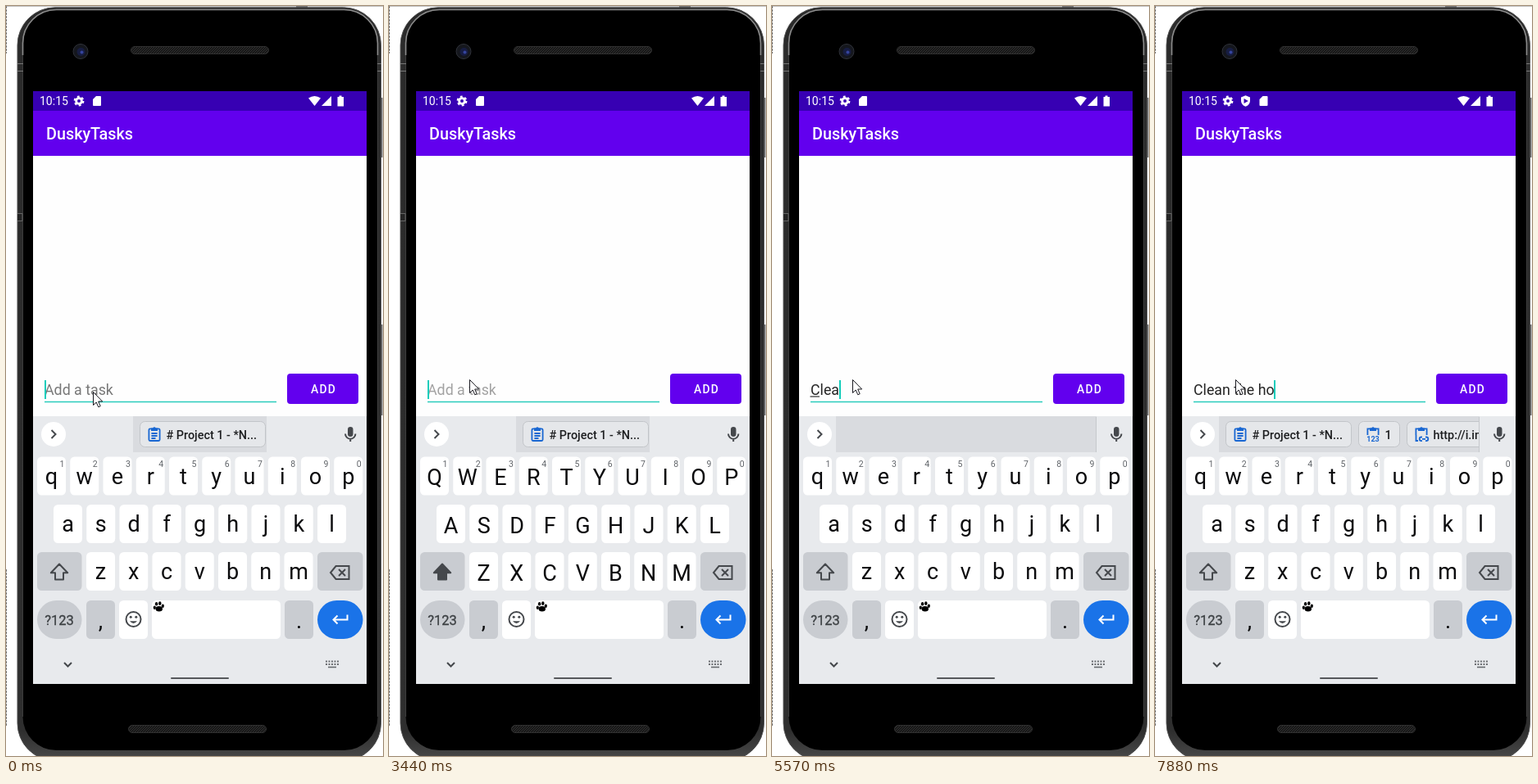
Recreate the animation shown at these times as an HTML page. Size 460 px wide and 916 px high, loop 8 s.

```html
<!DOCTYPE html>
<html lang="en">
<head>
<meta charset="utf-8">
<title>To-do typing</title>
<style>
  html, body { margin: 0; width: 100%; height: 100%; overflow: hidden; background: #fff; }
  svg { display: block; width: 460px; height: 916px; font-family: Roboto, sans-serif; }
  text { white-space: pre; }
  .key { font-size: 27px; text-anchor: middle; fill: #0b0b0d; }
  .num { font-size: 10.5px; text-anchor: middle; fill: #5f6368; }
  .chip { font-size: 14.4px; font-weight: 500; fill: #1d1e20; }
  .line { fill: none; stroke: #45484c; stroke-width: 2; }
  .blue { fill: none; stroke: #1967d2; stroke-width: 1.8; }
</style>
</head>
<body>
<svg viewBox="0 0 460 916">
  <defs>
    <pattern id="mesh" width="3" height="3" patternUnits="userSpaceOnUse">
      <rect width="3" height="3" fill="#161616"/><path d="M0 3L3 0" stroke="#363636" stroke-width=".9"/>
    </pattern>
    <linearGradient id="metal" x2="0" y2="1">
      <stop offset="0" stop-color="#2a2a2a"/><stop offset=".96" stop-color="#2e2e2e"/>
      <stop offset="1" stop-color="#4a4a4a"/>
    </linearGradient>
    <clipPath id="stripClip"><rect x="78" y="501" width="317" height="44"/></clipPath>
    <g id="board">
      <rect x="-6.6" y="-6.6" width="13.2" height="14.6" rx="1.4" class="blue"/>
      <path d="M-4-7.5h2.2a2 2 0 0 1 3.6 0H4v3.6H-4z" fill="#1967d2"/>
    </g>
    <g id="lines"><path d="M-3.6-1H3.6M-3.6 2H3.6M-3.6 5H1.5" class="blue" stroke-width="1.5"/></g>
    <g id="halfBoard">
      <path d="M-6.6 1V-6.6H6.6V1" class="blue"/>
      <path d="M-4-7.5h2.2a2 2 0 0 1 3.6 0H4v3.6H-4z" fill="#1967d2"/>
    </g>
    <g id="mainChip">
      <rect x=".5" y="507.5" width="153" height="31" rx="6" fill="#e5e7ea" stroke="#c2c5c9"/>
      <use href="#board" x="18" y="523"/><use href="#lines" x="18" y="523"/>
      <text x="32.5" y="529" class="chip"># Project 1 - *N...</text>
    </g>
  </defs>

  <!-- phone -->
  <path d="M0 .5H460" stroke="#c4c4c4"/>
  <path d="M.5 0V58M.5 688V880" stroke="#777" stroke-dasharray="3 1"/>
  <path d="M354 1h14" stroke="#777" stroke-width="2"/>
  <path d="M458.5 112V185M458.5 389V500" stroke="#6b6b6b" stroke-width="2"/>
  <rect x="14" y="1.8" width="443.5" height="920" rx="46" fill="url(#metal)" stroke="#4a4a4a"/>
  <rect x="20.5" y="4.5" width="433" height="904.500" rx="41" fill="#000"/>
  <path d="M20.5 60V45.500A41 41 0 0 1 61.5 4.500H412.500A41 41 0 0 1 453.500 45.500V60" fill="none" stroke="#8c8c8c" stroke-width="1.600"/>
  <path d="M20.500 60V868M453.500 60V868" stroke="#3c3c3c"/>
  <path d="M14 70.5h7M14 79.5h7M453 70.5h5M453 79.5h5" stroke="#777"/>
  <path d="M14 253.5h6v9h-6" fill="#242424" stroke="#666"/>
  <rect x="152.5" y="49.5" width="168" height="9" rx="4.5" fill="url(#mesh)" stroke="#303030"/>
  <rect x="149.5" y="878.5" width="168" height="9" rx="4.5" fill="url(#mesh)" stroke="#303030"/>
  <circle cx="91" cy="55.5" r="9" fill="#15171d" stroke="#30333a"/>
  <circle cx="91.5" cy="56" r="5" fill="#171d42"/><circle cx="92.5" cy="56.5" r="2" fill="#35449c"/>

  <!-- app -->
  <rect x="33" y="104" width="407" height="724" fill="#fefefe"/>
  <rect x="33" y="104" width="407" height="24" fill="#3700b3"/>
  <rect x="33" y="128" width="407" height="55" fill="#6200ee"/>
  <g fill="#fff">
    <text x="41" y="121" font-size="14">10:15</text>
    <text x="49" y="163" font-size="19.8" font-weight="500">DuskyTasks</text>
    <circle cx="89" cy="116" r="5.2" fill="none" stroke="#fff" stroke-width="2.4" stroke-dasharray="2.7 2.745"/>
    <circle cx="89" cy="116" r="3.4" fill="none" stroke="#fff" stroke-width="2.8"/>
    <path id="sd" d="M110 110H115q1 0 1 1V121q0 1-1 1H107q-1 0-1-1V114z"/>
    <g id="shield">
      <path d="M0-6.800L5.500-4.400V-.5C5.500 3 3.200 5.800 0 6.800C-3.200 5.800-5.500 3-5.500-.5V-4.400z"/>
      <path d="M-2-3L3.300 0L-2 3z" fill="#3700b3"/>
    </g>
    <path d="M369 112.500q7.500-5 15 0L376.500 122z"/>
    <path d="M397 110v12h-12z"/>
    <path d="M406.500 109.500h3v1.500h2.500v11.500h-7.500V111h2z"/>
  </g>
  <path d="M47 483.500H330" stroke="#2accbc" stroke-width="1.600"/>
  <text id="field" x="47" y="475.300" font-size="17.8"></text>
  <path id="compose" d="M46.500 477H58" stroke="#333" stroke-width="1.2"/>
  <rect id="caret" y="457" width="2" height="23" fill="#14cdbb"/>
  <rect x="343" y="449" width="87" height="37" rx="4" fill="#6200ee"/>
  <text x="372" y="473" font-size="13.85" font-weight="500" letter-spacing="1.24" fill="#fff">ADD</text>

  <!-- keyboard -->
  <rect x="33" y="501" width="407" height="327" fill="#e8eaed"/>
  <rect id="strip" y="501" height="44" fill="#d9dbdf"/>
  <path id="stripEdge" d="M395.500 502V545" stroke="#c5c8cc"/>
  <use id="single" href="#mainChip" x="163"/>
  <g id="trio" clip-path="url(#stripClip)">
    <use href="#mainChip" x="86"/>
    <rect x="248.500" y="507.500" width="50" height="31" rx="6" fill="#e5e7ea" stroke="#c2c5c9"/>
    <use href="#halfBoard" x="266" y="523"/>
    <text x="266" y="532" font-size="9" font-weight="700" fill="#1967d2" text-anchor="middle">123</text>
    <text x="280.500" y="529" class="chip">1</text>
    <rect x="307.500" y="507.500" width="120" height="31" rx="6" fill="#e5e7ea" stroke="#c2c5c9"/>
    <use href="#halfBoard" x="325" y="523"/>
    <path d="M318.500 524v7h2.500M326 526.500h-1a2.300 2.300 0 0 0 0 4.600h1M330 526.500h1a2.300 2.300 0 0 1 0 4.600h-1M326 528.800h4" class="blue" stroke-width="1.5"/>
    <text x="339.500" y="529" class="chip">http://i.im</text>
  </g>
  <circle cx="58" cy="523" r="15" fill="#fff"/>
  <path d="M55.500 518l5 5-5 5" class="line"/>
  <rect x="417" y="514" width="6.500" height="12" rx="3.200" fill="#45484c"/>
  <path d="M414 522.500a6.200 6.200 0 0 0 12.400 0M420.200 528.500V532" class="line" stroke-width="1.800"/>
  <g id="keys"></g>
  <path id="shift" d="M65 681.500L54.800 692.200H60V700.500H70V692.200H75.200z" class="line" stroke-linejoin="round"/>
  <path d="M402.500 684H418.500V700H402.500L396 692zM406 688l8 8M414 688l-8 8" class="line"/>
  <text x="65" y="755.500" font-size="16.500" text-anchor="middle" fill="#3c4043" stroke="#3c4043" stroke-width=".3">?123</text>
  <circle cx="155.500" cy="749" r="9" class="line"/>
  <circle cx="152.200" cy="746.300" r="1.500" fill="#45484c"/><circle cx="158.800" cy="746.300" r="1.500" fill="#45484c"/>
  <path d="M151 751.300q4.500 5.500 9 0z" fill="#45484c"/>
  <g transform="translate(-.7 -.7)">
    <ellipse cx="187.500" cy="737" rx="4.200" ry="3.200"/>
    <ellipse cx="182" cy="735.500" rx="1.600" ry="2.200"/><ellipse cx="184.300" cy="731" rx="1.700" ry="2.300"/>
    <ellipse cx="188.500" cy="730.300" rx="1.700" ry="2.300"/><ellipse cx="192" cy="733.500" rx="1.600" ry="2.200"/>
  </g>
  <path d="M416.500 743.500v6H399.500M404.500 744.500l-5 5 5 5" fill="none" stroke="#fff" stroke-width="2"/>
  <path d="M71 802l4.500 4.500L80 802" class="line" stroke-width="1.600"/>
  <path d="M390 800.500h16M390 804h16" stroke="#66696d" stroke-width="1.800" stroke-dasharray="1.900 1.600"/>
  <path d="M393 807.500h10" stroke="#66696d" stroke-width="1.600"/>
  <rect x="201" y="820" width="71" height="2" rx="1" fill="#56585b"/>
  <path id="mouse" d="M.5.500V16.500L4.200 13L6.800 18.800L9.200 17.700L6.700 12H11.700z" fill="#fff" stroke="#18181f"/>
</svg>
<script>
const LOOP = 8000;
const $ = id => document.getElementById(id);
const PITCH = 40.25;

// Keys
const keyRect = (x, y, w, fill = '#fff', r = 5.5) =>
  `<rect x="${x}" y="${y}" width="${w}" height="47" rx="${r}" fill="${fill}"/>`;
const GREY = '#c9ccd1';
let keys = '';
[['qwertyuiop', 38, 550.5], ['asdfghjkl', 58, 609], ['zxcvbnm', 98, 667]].forEach(([row, x0, y], r) => {
  [...row].forEach((ch, i) => {
    const x = x0 + i * PITCH;
    keys += keyRect(x, y, 35);
    keys += `<text class="key letter" x="${x + 17.5}" y="${y + 33}">${ch}</text>`;
    if (!r) keys += `<text class="num" x="${x + 30.5}" y="563">${(i + 1) % 10}</text>`;
  });
});
keys += keyRect(38, 667, 54.5, GREY) + keyRect(380, 667, 55.5, GREY)
  + keyRect(38, 726, 54.5, GREY, 23.5) + keyRect(98, 726, 35, GREY) + keyRect(138, 726, 35)
  + keyRect(178, 726, 157) + keyRect(340, 726, 35, GREY) + keyRect(380, 726, 55.5, '#1a73e8', 23.5)
  + '<text class="key" x="115.5" y="760">,</text><text class="key" x="357.5" y="760">.</text>';
$('keys').innerHTML = keys;
const letters = [...document.querySelectorAll('.letter')];

// Each track lists [start, value]; the latest one that has begun holds.
const typed = [[0, ''], [3720, 'C'], [5270, 'Cl'], [5570, 'Clea'], [5850, 'Clean'], [5980, 'Clean '],
  [6560, 'Clean t'], [6690, 'Clean the'], [6840, 'Clean the '], [7630, 'Clean the h'], [7880, 'Clean the ho']];
const caretOn = [[0, 1], [3160, 0], [3290, 1], [4860, 0], [5270, 1]];
const strips = [[0, 'start'], [3990, 'wide'], [5430, 'empty'], [5980, 'trio']];
const pointer = [[0, [106, 471]], [140, [106, 469]], [390, [102, 462]], [520, [98, 456]]];
const notice = [[0, 0], [6840, .25], [6960, .6], [7080, .9], [7200, 1]];
const at = (track, t) => track.filter(s => s[0] <= t).pop()[1];
const show = (id, on) => $(id).setAttribute('visibility', on ? 'visible' : 'hidden');

const ADVANCE = { C: .651, l: .243, e: .53, a: .544, n: .552, t: .327, h: .551, o: .57, ' ': .248 };
const textWidth = s => [...s].reduce((w, c) => w + ADVANCE[c] * 17.8, 0);

function draw(t) {
  const text = at(typed, t), strip = at(strips, t);
  const caps = t >= 3440 && t < 3860, p = at(notice, t);

  $('field').textContent = text || 'Add a task';
  $('field').setAttribute('fill', text ? '#252525' : t < 2290 ? '#777' : '#a2a2a2');
  $('caret').setAttribute('x', Math.round(46.5 + textWidth(text)));
  show('caret', at(caretOn, t));
  show('compose', t >= 3990 && t < 6250);

  const left = strip === 'start' ? 155 : 78;
  const right = strip === 'start' || strip === 'wide' ? 318 : 396;
  $('strip').setAttribute('x', left);
  $('strip').setAttribute('width', right - left);
  show('stripEdge', right === 396);
  show('single', right === 318);
  show('trio', strip === 'trio');

  for (const el of letters) {
    const ch = el.textContent;
    el.textContent = caps ? ch.toUpperCase() : ch.toLowerCase();
    el.setAttribute('dy', caps ? 1.5 : 0);
  }
  $('shift').style.fill = caps ? '#45484c' : 'none';

  $('sd').setAttribute('transform', `translate(${21.5 * p})`);
  $('shield').setAttribute('transform', `translate(${102 + 8.5 * p} 116)`);
  $('shield').setAttribute('opacity', p);
  $('mouse').setAttribute('transform', `translate(${at(pointer, t)})`);
}

const begin = performance.now();
function tick(now) {
  draw(Math.max(0, now - begin) % LOOP);
  requestAnimationFrame(tick);
}
draw(0);
requestAnimationFrame(tick);
</script>
</body>
</html>
```
